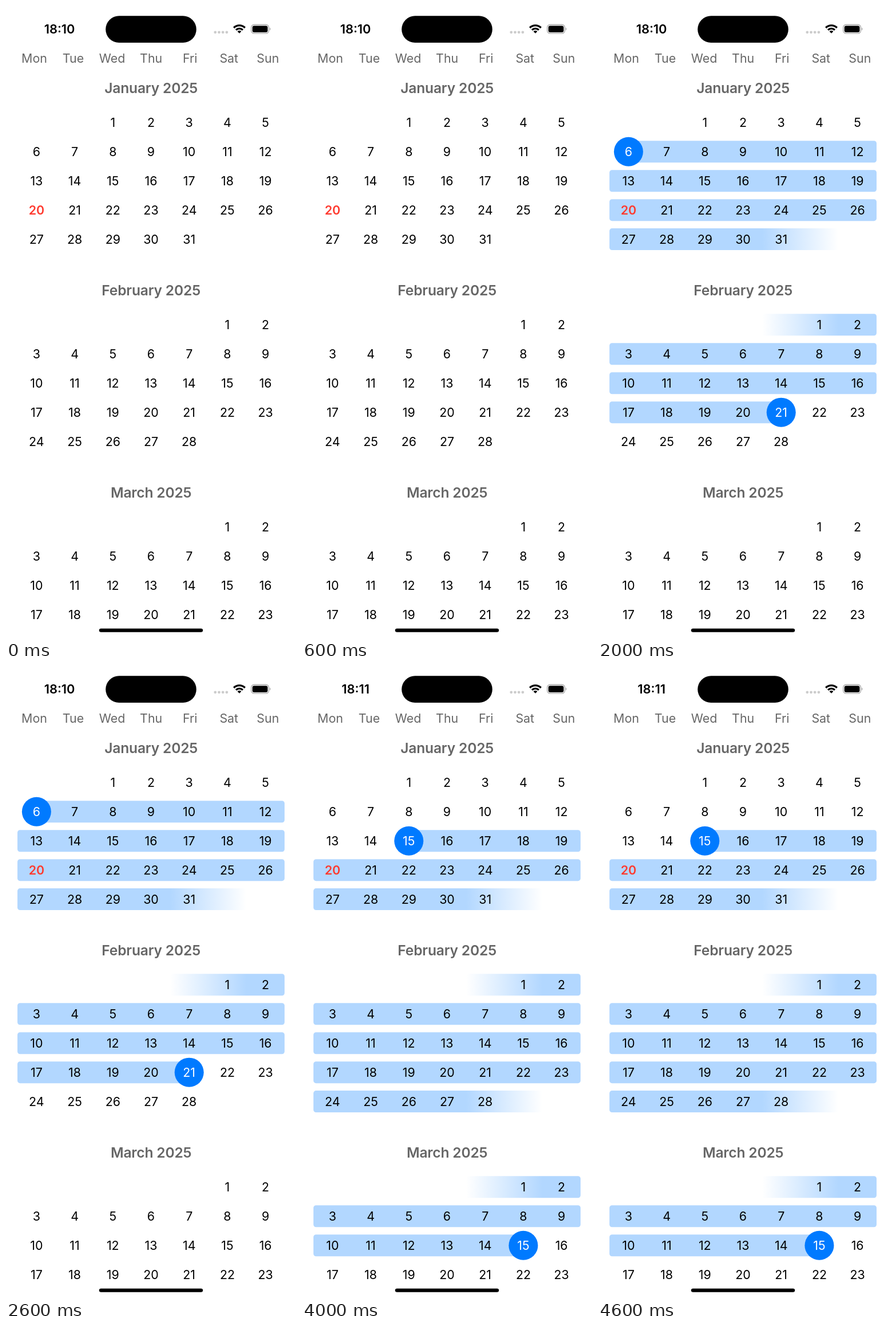
Recreate the animation shown at these times as an HTML page. Size 507 by 1103 pixels, loop 5000 ms.

```html
<!DOCTYPE html>
<html lang="en">
<head>
<meta charset="utf-8">
<title>Calendar range picker</title>
<style>
  html, body { margin: 0; width: 100%; height: 100%; overflow: hidden; background: #fff; }
  svg { display: block; width: 507px; height: 1103px; }
  text { font: 400 21.4px Inter, "Liberation Sans", sans-serif; text-anchor: middle; }
  .label { fill: #666; }
  .title { fill: #666; font-size: 24.6px; font-weight: 600; letter-spacing: -.2px; }
  .clock { font-size: 21.8px; font-weight: 600; }
  .today { fill: #ff3b30; font-weight: 600; }
  .picked { fill: #fff; }
</style>
</head>
<body>
<svg viewBox="0 0 507 1103">
  <defs>
    <linearGradient id="out" gradientUnits="userSpaceOnUse" x1="287" x2="420">
      <stop stop-color="#b2d7ff"/><stop offset="1" stop-color="#fff"/>
    </linearGradient>
    <linearGradient id="in" gradientUnits="userSpaceOnUse" x1="287" x2="420">
      <stop stop-color="#fff"/><stop offset="1" stop-color="#b2d7ff"/>
    </linearGradient>
  </defs>
  <text id="clock" class="clock" x="93.6" y="48.3"></text>
  <rect x="174.2" y="17.3" width="158.6" height="46.8" rx="23.4"/>
  <g fill="#ccc">
    <circle cx="365.8" cy="45.8" r="2.4"/><circle cx="372.5" cy="45.8" r="2.4"/>
    <circle cx="379.2" cy="45.8" r="2.4"/><circle cx="385.9" cy="45.8" r="2.4"/>
  </g>
  <g transform="translate(408 47.8)">
    <path d="M0 0L-3.4-3.4A4.8 4.8 0 0 1 3.4-3.4Z"/>
    <path d="M-6-6A8.5 8.5 0 0 1 6-6M-9.8-9.8A13.9 13.9 0 0 1 9.8-9.8" fill="none" stroke="#000" stroke-width="3.3"/>
  </g>
  <rect x="428.7" y="32.5" width="30.8" height="15.4" rx="5" fill="none" stroke="#a6a6a6" stroke-width="1.3"/>
  <rect x="430.7" y="34.5" width="26.8" height="11.4" rx="3.2"/>
  <path d="M461 37.6Q464 40.2 461 42.8Z" fill="#a6a6a6"/>
  <g id="labels"></g>
  <g id="grid"></g>
  <rect x="162.8" y="1086.4" width="181.4" height="6.4" rx="3.2"/>
</svg>
<script>
const LEFT = 20, RIGHT = 487, COL = (RIGHT - LEFT) / 7, ROW = 50.95;
const months = [
  { name: "January", offset: 2, days: 31, last: 31 },
  { name: "February", offset: 5, days: 28, last: 28 },
  { name: "March", offset: 5, days: 31, last: 23 }
];
// Picked days as [month, day]: none, one, or the two ends of a range
const steps = [
  { clock: "18:10", picks: [] },
  { clock: "18:10", picks: [[0, 6]] },
  { clock: "18:10", picks: [[0, 6], [1, 21]] },
  { clock: "18:11", picks: [[2, 15]] },
  { clock: "18:11", picks: [[0, 15], [2, 15]] }
];
const $ = id => document.getElementById(id);
const colX = c => LEFT + COL * (c + .5);
const rowY = (m, r) => 203.3 + 353 * m + ROW * r;
const text = (x, y, s, cls = "") => `<text x="${x}" y="${y}" class="${cls}">${s}</text>`;

function cell(m, day) {
  const i = day - 1 + months[m].offset;
  return { col: i % 7, row: Math.floor(i / 7) };
}

function band(x1, x2, y, fill) {
  return `<rect x="${x1}" y="${y - 19}" width="${x2 - x1}" height="38" rx="4.5" fill="${fill}"/>`;
}

function monthBands(m, [m1, d1], [m2, d2]) {
  if (m < m1 || m > m2) return "";
  const from = cell(m, m === m1 ? d1 : 1);
  const to = cell(m, m === m2 ? d2 : months[m].days);
  let svg = "";
  for (let r = from.row; r <= to.row; r++) {
    let x1 = LEFT, x2 = RIGHT, fill = "#b2d7ff";
    if (r === from.row) {
      if (m === m1) x1 = colX(from.col);
      else { x1 = colX(from.col - 1.5); fill = "url(#in)"; }
    }
    if (r === to.row) {
      if (m === m2) x2 = colX(to.col);
      else { x2 = colX(to.col + 1.5); fill = "url(#out)"; }
    }
    svg += band(x1, x2, rowY(m, r), fill);
  }
  return svg;
}

function monthView(m, picks) {
  const { name, last } = months[m];
  let svg = text(253.7, 151.6 + 353 * m, name + " 2025", "title");
  if (picks.length === 2) svg += monthBands(m, ...picks);
  for (let d = 1; d <= last; d++) {
    const { col, row } = cell(m, d), x = colX(col), y = rowY(m, row);
    const picked = picks.some(p => p[0] === m && p[1] === d);
    if (picked) svg += `<circle cx="${x}" cy="${y}" r="25.5" fill="#007aff"/>`;
    svg += text(x, y + 8.1, d, picked ? "picked" : m === 0 && d === 20 ? "today" : "");
  }
  return svg;
}

$("labels").innerHTML = ["Mon", "Tue", "Wed", "Thu", "Fri", "Sat", "Sun"]
  .map((s, i) => text(49.5 + 68.05 * i, 99.2, s, "label")).join("");

let shown = -1;
function draw(now) {
  const i = Math.floor(now / 1000) % steps.length;
  if (i !== shown) {
    shown = i;
    $("clock").textContent = steps[i].clock;
    $("grid").innerHTML = months.map((_, m) => monthView(m, steps[i].picks)).join("");
  }
}

const start = performance.now();
function tick() {
  draw(performance.now() - start);
  requestAnimationFrame(tick);
}
tick();
</script>
</body>
</html>
```
